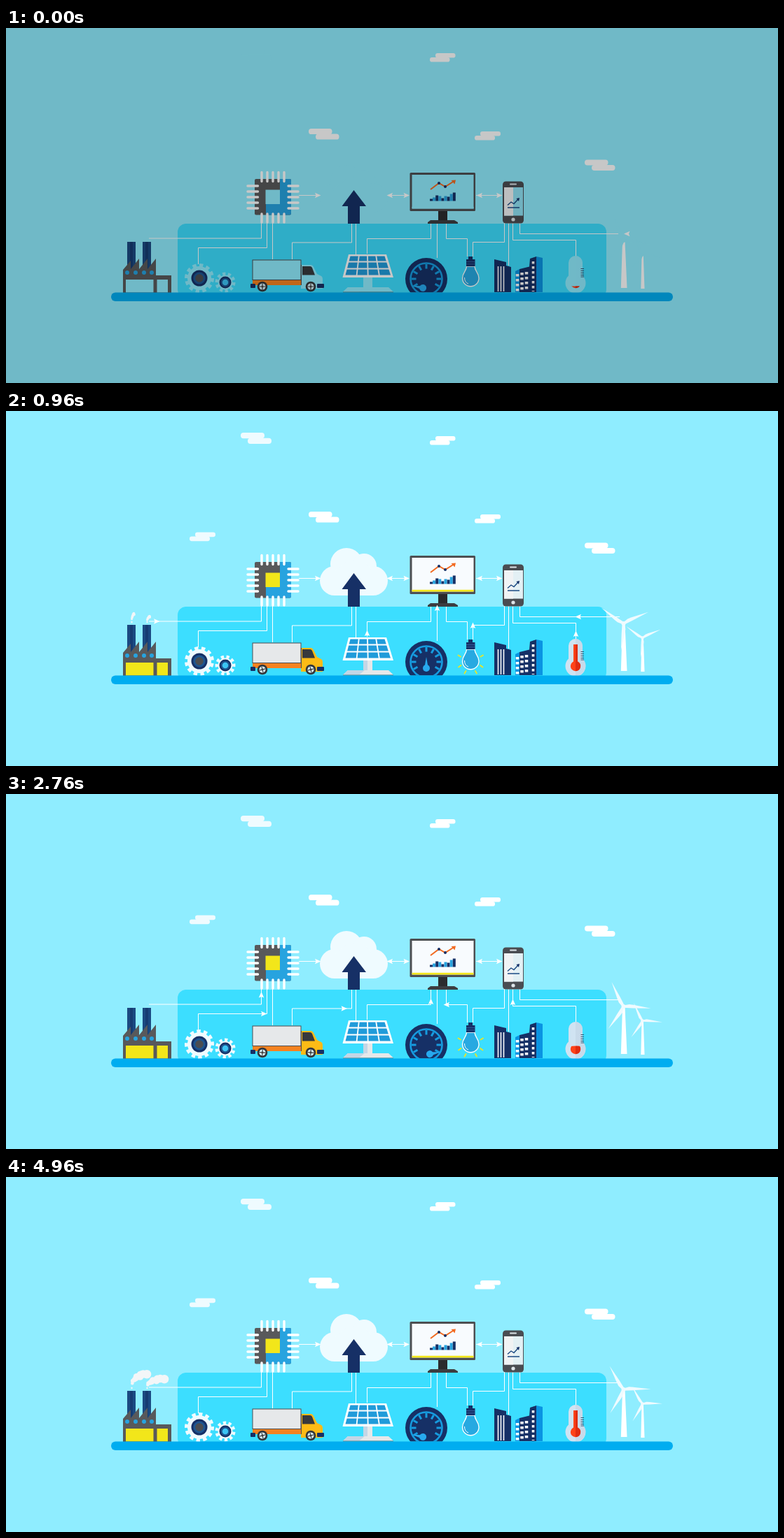
An HTML page that plays this animation: 1102x508 px, repeating every 5 s.

```html
<!DOCTYPE html>
<html lang="en">
<head>
<meta charset="utf-8">
<title>Connected industry</title>
<style>
html, body { margin: 0; width: 100%; height: 100%; overflow: hidden; background: #8fedff; }
svg { display: block; width: 1102px; height: 508px;
  --pale: #effbff; --screen: #f8fbfe; --grey: #e6e8ea; --yellow: #f2e61a; --cab: #fdbb16; --glass: #d0e3f2; --shade: #c3d6e6; }
svg.dim { --pale: #8fedff; --screen: #8fedff; --grey: #8fedff; --yellow: #8fedff; --cab: #8fedff; --glass: #8fedff; --shade: #8fedff; }
#veil { opacity: 0; }
.dim #veil { opacity: .22; }
.w { fill: #fff; } .pale { fill: var(--pale); } .grey { fill: var(--grey); }
.yellow { fill: var(--yellow); } .dark { fill: #58595b; } .navy { fill: #163066; }
.blue { fill: #27a3df; } .sky { fill: #00adf0; } .orange { fill: #f58220; }
.line { fill: none; stroke: #fff; }
</style>
</head>
<body>
<svg id="stage" viewBox="0 0 1102 508" xmlns="http://www.w3.org/2000/svg">
  <defs>
    <clipPath id="aboveGround"><rect x="560" y="320" width="80" height="58.5"/></clipPath>
    <clipPath id="mercury"><rect id="level" x="800" width="26" height="80"/></clipPath>
    <path id="blade" d="M-1.500 0L-3.600-8L-3.200-14L0-39L1.500-14L1.800 0Z"/>
    <g id="rotor"><use href="#blade"/><use href="#blade" transform="rotate(120)"/><use href="#blade" transform="rotate(240)"/></g>
    <path id="head" d="M4.500 0L-4-3.700L-2.400 0L-4 3.700Z"/>
    <g id="wheel">
      <circle r="4.600" fill="#d7f1f8"/>
      <path d="M-4.500 0H4.500M0-4.500V4.500" stroke="#444" stroke-width="1.200"/>
      <circle r="1.500" fill="#444"/>
    </g>
  </defs>

  <rect width="1102" height="508" fill="#8fedff"/>
  <rect class="w" x="273" y="179.500" width="15" height="1"/>
  <g id="clouds"></g>
  <rect x="245" y="280" width="612" height="106" rx="12" fill="#3cdeff"/>
  <g id="wires" class="line"></g>

  <g id="chip">
    <rect class="dark" x="355" y="216" width="52" height="51.500" rx="2"/>
    <path class="blue" d="M391 216H405Q407 216 407 218V265.500Q407 267.500 405 267.500H371V252H391Z"/>
    <rect class="yellow" x="370.500" y="231.500" width="20.500" height="20.500"/>
    <g id="pins" stroke="#fff" stroke-width="3.400" stroke-linecap="round"></g>
  </g>

  <g class="pale">
    <circle cx="469" cy="243" r="21"/><circle cx="486" cy="219" r="23"/>
    <circle cx="511" cy="222" r="18"/><circle cx="524" cy="243" r="21"/>
    <path d="M469 230L486 215L511 215L524 230V264H469Z"/>
  </g>
  <path class="navy" d="M496.500 232L514 255H505V280H488V255H479.500Z"/>

  <g class="line">
    <path d="M418 239.500H447M546 239.500H575M671 239.500H708"/>
  </g>
  <g id="links" class="w"></g>

  <g id="monitor">
    <rect x="576.500" y="207" width="93.500" height="55" rx="1.500" fill="#4d4f52"/>
    <rect x="579.500" y="210" width="88" height="48.500" style="fill:var(--screen)"/>
    <rect x="579.500" y="255.800" width="88" height="2.700" class="yellow"/>
    <path d="M617 262H630V275H617Z" fill="#2b2c2e"/>
    <path d="M606 275H640L645 278V280H602V278Z" fill="#3c3d40"/>
    <path d="M606 231L618 222L627 227L639 219.500" fill="none" stroke="#f26a21" stroke-width="2"/>
    <path d="M642 217.500L640.500 223.500L635.500 218Z" fill="#f26a21"/>
    <circle class="navy" cx="618" cy="222" r="2"/><circle class="navy" cx="627" cy="227" r="2"/>
    <g id="bars"></g>
  </g>

  <g id="phone">
    <rect x="709" y="219.500" width="30" height="60" rx="4.500" fill="#4a4d52"/>
    <rect class="pale" x="711" y="228" width="27" height="40.500"/>
    <rect x="711" y="228" width="13" height="40.500" fill="#fff"/>
    <rect x="711" y="228" width="27" height="40.500" fill="#8a98a0" opacity=".12"/>
    <rect x="719" y="222.500" width="10" height="2" rx="1" fill="#dfe6ea"/>
    <circle cx="724" cy="274" r="2.600" fill="#dfe6ea"/>
    <path d="M716 253.500L721 249L725 251.500L731 245M716 257H733" fill="none" stroke="#1b4a82" stroke-width="1.400"/>
    <path class="navy" d="M733 243L732 248L728.500 244Z"/>
  </g>

  <g id="factory">
    <path d="M173 306H185V348H173ZM195 306H207V348H195Z" fill="#1b4a82"/>
    <path d="M177 306H181V348H177ZM199 306H203V348H199Z" fill="#163c72"/>
    <path class="dark" d="M167 379V346L178 333V345L190 330V345L202 330V345L214 330V354H236V379Z"/>
    <path class="yellow" d="M171 360H210.500V378.500H171ZM215.500 360H231V378.500H215.500Z"/>
    <g id="dots" class="blue"></g>
  </g>
  <g id="smoke" fill="#f3f6f8"></g>

  <g id="gears"></g>

  <g id="truck">
    <rect class="orange" x="352" y="360" width="70" height="8"/>
    <rect class="grey" x="352" y="332" width="69" height="28.500" stroke="#4c4d50"/>
    <path d="M421 339H435Q438 339 440 344L444 352L450 355Q452 356 452 360V373H421Z" style="fill:var(--cab)"/>
    <path d="M423 341H434Q436 341 437 343L441 353.500H423Z" fill="#37393d"/>
    <path d="M421.500 339V368" stroke="#4c4d50"/>
    <rect class="navy" x="444" y="366" width="10" height="6" rx="1"/>
    <rect class="navy" x="349" y="366" width="7" height="6" rx="1"/>
    <circle cx="366" cy="370" r="7.300" fill="#34363a"/><circle cx="435" cy="370" r="7.300" fill="#34363a"/>
    <g transform="translate(366 370)"><use href="#wheel" class="spin"/></g>
    <g transform="translate(435 370)"><use href="#wheel" class="spin"/></g>
  </g>

  <g id="solar">
    <path class="grey" d="M510 356H523V371H510ZM488 371H546L553 377.500H481Z"/>
    <path d="M510 356H516V371H510ZM488 371H512L504 377.500H481Z" style="fill:var(--shade)"/>
    <path d="M481 378H553" stroke="#58595b" stroke-width=".8"/>
    <path class="w" d="M489 324H543L553 357H480.500Z"/>
    <path d="M491.500 326.500H540.500L549 353.500H484.500Z" fill="#209bda"/>
    <g id="cells" class="line" stroke-width="1.800"></g>
  </g>

  <g id="gauge" clip-path="url(#aboveGround)">
    <circle class="navy" cx="600" cy="359" r="30"/>
    <circle cx="600" cy="359" r="22.500" fill="none" stroke="#169ce0" stroke-width="2.600"/>
    <g id="ticks" stroke="#169ce0" stroke-width="3"></g>
    <g id="needle" transform="translate(600 373)"><g id="hand" fill="#27a9ee">
      <path d="M-2.800-5L0-21L2.800-5Z"/><circle cy="-5" r="5"/>
    </g></g>
  </g>

  <g id="bulb">
    <path d="M657.500 341C657.500 348 651.500 350 651.500 358A11.700 11.700 0 0 0 675 358C675 350 669 348 669 341Z" fill="#27a9e1" stroke="#fff" stroke-width="1.300"/>
    <path class="line" d="M654.500 357Q654.500 364 660 366"/>
    <path class="navy" d="M660 327H666V331H669.500V341H657V331H660Z"/>
    <path d="M657 334.500H669.500M657 337.800H669.500" stroke="#3c6cab" stroke-width=".7"/>
    <g id="rays" stroke="#f2e61a" stroke-width="1.700" stroke-linecap="round"></g>
  </g>

  <g id="city">
    <path class="navy" d="M697 331L714 335V340L721 342V378H697Z"/>
    <path class="line" d="M702.500 341V377M706.500 341V377M710.500 341V377" stroke-width="1.600"/>
    <path d="M727 348L733 345V378H727Z" fill="#0a94e2"/>
    <path class="navy" d="M733 345L747 341.500L748 330L757 327V378H733Z"/>
    <path d="M757 327L766 329V378H757Z" fill="#0a94e2"/>
    <path class="line" d="M730 352V377M736.500 350V377M743 349V377" stroke-dasharray="3.500 3.500" stroke-width="4.500"/>
    <path class="line" d="M752.500 334V377" stroke-dasharray="3.500 3.500" stroke-width="3.600"/>
  </g>

  <g id="thermo">
    <path d="M803 336A10 10 0 0 1 823 336V354.500A14.500 14.500 0 1 1 803 354.500Z" style="fill:var(--glass)"/>
    <path d="M813 326A10 10 0 0 1 823 336V354.500A14.500 14.500 0 0 1 813 379Z" style="fill:var(--shade)" opacity=".6"/>
    <path d="M820.500 344.500H825M820.500 347.500H825M820.500 350.500H825M820.500 353.500H825M820.500 356H825" stroke="#34506e" stroke-width="1.100"/>
    <g clip-path="url(#mercury)">
      <path d="M810 334H816V365H810Z" fill="#ff4218"/><circle cx="813" cy="365" r="7.200" fill="#ff4218"/>
      <path d="M813 334H816V358.500A7.200 7.200 0 0 1 813 372.200Z" fill="#e02c12"/>
    </g>
  </g>

  <rect class="sky" x="150" y="378.500" width="802" height="12.500" rx="6.200"/>

  <g id="turbines">
    <path class="w" d="M880 305H883.500L886.500 372H877.800ZM907.500 325H909.800L911.500 373H906.300Z"/>
    <g class="pale">
      <g transform="translate(881.500 304)"><use href="#rotor" class="rotor"/><circle r="3"/></g>
      <g transform="translate(908.500 324.500) scale(.73)"><use href="#rotor" class="rotor"/><circle r="3"/></g>
    </g>
  </g>
  <g id="heads" class="w"></g>
  <rect id="veil" width="1102" height="508"/>
</svg>

<script>
const NS = "http://www.w3.org/2000/svg", LOOP = 5000, STEP = 40;
const $ = id => document.getElementById(id);
const add = (parent, tag, attrs) => {
  const el = document.createElementNS(NS, tag);
  for (const k in attrs) el.setAttribute(k, attrs[k]);
  return parent.appendChild(el);
};
const turn = (el, deg) => el.setAttribute("transform", `rotate(${deg})`);

// linear interpolation through [time, value] pairs
function track(keys, t) {
  const i = keys.findIndex(k => k[0] >= t);
  if (i < 0) return keys[keys.length - 1][1];
  if (i === 0) return keys[0][1];
  const [t0, a] = keys[i - 1], [t1, b] = keys[i];
  return a + (b - a) * (t - t0) / (t1 - t0);
}

function cloud(x1, x2, y, w, h, cls) {
  add($("clouds"), "rect", { x: x1, y, width: w, height: h + .3, rx: h / 2, class: cls });
  add($("clouds"), "rect", { x: x2, y: y + h - .3, width: w, height: h + .3, rx: h / 2, class: cls });
}
cloud(335, 345, 31, 34, 8, "pale");
cloud(613, 605, 36, 28.5, 6.3, "w");
cloud(432, 442, 144, 33.5, 7.8, "w");
cloud(677, 669, 148, 29, 6.3, "w");
cloud(270, 262, 173.6, 29, 6.3, "pale");
cloud(826, 836, 188.4, 33.5, 7.8, "w");

for (let i = 0; i < 5; i++) {
  const x = 365 + 8 * i, y = 226 + 8 * i;
  add($("pins"), "path", { d: `M${x} 206.500V219.500M${x} 266V278M345 ${y}H359.500M403 ${y}H417` });
}
for (const [x, dir] of [[445, 1], [548, -1], [571.5, 1], [676, -1], [704, 1]])
  add($("links"), "use", { href: "#head", transform: `translate(${x} 239.500) scale(${dir} 1)` });
[3, 5, 8, 7, 4, 7, 6, 10, 12].forEach((h, i) =>
  add($("bars"), "rect", { x: 605 + 4.1 * i, y: 247.5 - h, width: 4, height: h, class: i % 2 ? "blue" : "navy" }));
for (const x of [173, 185, 197, 208]) add($("dots"), "circle", { cx: x, cy: 350, r: 3 });
for (let i = 1; i < 4; i++)
  add($("cells"), "path", { d: `M${491.5 + 12.25 * i} 326L${484.5 + 16.1 * i} 354` });
add($("cells"), "path", { d: "M488 334.500H544M485 344.500H547.500" });
for (let a = -120; a <= 120; a += 30)
  add($("ticks"), "path", { d: "M0-21V-14.500", transform: `translate(600 359) rotate(${a})` });

function gear(x, y, r, teeth, core, coreFill) {
  const g = add($("gears"), "g", { transform: `translate(${x} ${y})` });
  const wheel = add(g, "g", {});
  add(wheel, "circle", { r: r - 4, class: "pale" });
  add(wheel, "circle", { r: r - 2.5, fill: "none", style: "stroke:var(--pale)", "stroke-width": 5,
    pathLength: teeth * 2, "stroke-dasharray": "1.1 .9" });
  add(g, "circle", { r: core, class: "navy" });
  add(g, "circle", { r: core * .75, fill: "#1d5590" });
  add(g, "circle", { r: core * .5, fill: coreFill });
  return wheel;
}
const bigGear = gear(276, 358, 21, 12, 11.5, "#4b4d51");
const smallGear = gear(313, 364, 14.5, 10, 8.5, "#3cc4f4");

// rays light up one after another, left to right
const rays = [[645.5, 349.5, 649, 351.5], [646, 366.5, 649.5, 364], [654.5, 375.5, 656.5, 372],
  [670, 372, 672, 375.5], [677, 364, 680.5, 366.5], [677.5, 351.5, 681, 349.5]]
  .map(([a, b, c, d]) => add($("rays"), "path", { d: `M${a} ${b}L${c} ${d}` }));

// wire path, then [time, distance] of its moving arrow
const wires = [
  ["M204 301H364.500V279", [[850, 0], [960, 11], [1720, 99], [2760, 174], [2880, 181]]],
  ["M274.500 338V314.500H372.500V279", [[1480, 0], [1720, 23], [2760, 117], [3640, 150], [3800, 157]]],
  ["M408.500 331V307H493.500V279", [[1480, 0], [1720, 19], [2760, 98], [3640, 132], [3760, 137]]],
  ["M515.500 323V301.500H606.500V279", [[880, 0], [960, 5], [1720, 31], [2760, 117], [3000, 135]]],
  ["M615.500 329V279", [[400, 0], [960, 47], [1000, 50]]],
  ["M658.500 327V301.500H628.500V279", [[1240, 0], [1720, 25], [2760, 55], [3200, 78]]],
  ["M666.500 327V306.500H711.500V279", [[640, 0], [960, 20], [1720, 59], [2300, 92]]],
  ["M717.500 340V279", [[1040, 0], [1720, 53], [1840, 61]]],
  ["M813.500 327V303.500H723.500V279", [[800, 0], [960, 8], [1720, 31], [2760, 119], [3000, 138]]],
  ["M876 294.500H733.500V279", [[-40, -11], [120, -11], [960, 59], [1720, 136], [1960, 158]]],
].map(([d, keys]) => ({
  path: add($("wires"), "path", { d }), keys, head: add($("heads"), "use", { href: "#head" })
}));
add($("wires"), "path", { d: "M380.500 279V331M499.500 279V324" });

function moveHead({ path, keys, head }, t) {
  const on = t >= keys[0][0] && t <= keys[keys.length - 1][0];
  head.style.display = on ? "" : "none";
  if (!on) return;
  const l = track(keys, t), p = path.getPointAtLength(Math.max(l, .5));
  const q = path.getPointAtLength(Math.max(l, .5) - .5);
  const a = Math.atan2(p.y - q.y, p.x - q.x);
  head.setAttribute("transform",
    `translate(${p.x + Math.min(l, 0) * Math.cos(a)} ${p.y}) rotate(${a * 180 / Math.PI})`);
}

const PUFFS = 10;
const plumes = [[179.5, 20, 21], [201.5, 23, 14]].map(([x, dx, dy]) => ({
  x, dx, dy, puffs: Array.from({ length: PUFFS }, () => add($("smoke"), "circle", {}))
}));
function drawSmoke(t) {
  const age = t < 3000 ? t - 650 : t - 3460;
  const reach = Math.min(1, Math.max(0, age) / 950);
  $("smoke").style.display = age > 0 && age < 1700 ? "" : "none";
  $("smoke").style.opacity = Math.min(1, (1700 - age) / 200);
  plumes.forEach(({ x, dx, dy, puffs }) => puffs.forEach((c, i) => {
    const s = reach * i / (PUFFS - 1), wob = Math.sin(i * 2.4 + age / 260);
    c.setAttribute("cx", x + dx * s ** 1.6 + wob * 2 * s);
    c.setAttribute("cy", 302 - dy * s ** .5 + wob * 1.6 * s);
    c.setAttribute("r", 1.2 + reach * 5 * s ** .7);
  }));
}

const LEVEL = [[0, 369.5], [80, 368.5], [920, 334], [1000, 334], [3100, 366], [4960, 334]];
const NEEDLE = [[0, -78], [120, -78], [960, 0], [1720, 70], [1900, 80], [3150, 80], [3640, 35], [4870, -78]];
const rotors = document.querySelectorAll(".rotor"), spins = document.querySelectorAll(".spin");

function draw(t) {
  $("stage").classList.toggle("dim", t < STEP);
  rotors.forEach(r => turn(r, 98 + .216 * t));
  spins.forEach(s => turn(s, .36 * t));
  turn(bigGear, .072 * t);
  turn(smallGear, -.0864 * t);
  turn($("hand"), track(NEEDLE, t));
  $("level").setAttribute("y", track(LEVEL, t));
  const phase = t % 1625;
  rays.forEach((r, i) => r.style.display = phase >= 90 + 130 * i && phase < 1450 ? "" : "none");
  wires.forEach(w => moveHead(w, t));
  drawSmoke(t);
}

const start = performance.now();
function tick() {
  const t = (performance.now() - start) % LOOP;
  draw(Math.floor(t / STEP) * STEP);
  requestAnimationFrame(tick);
}
tick();
</script>
</body>
</html>
```
